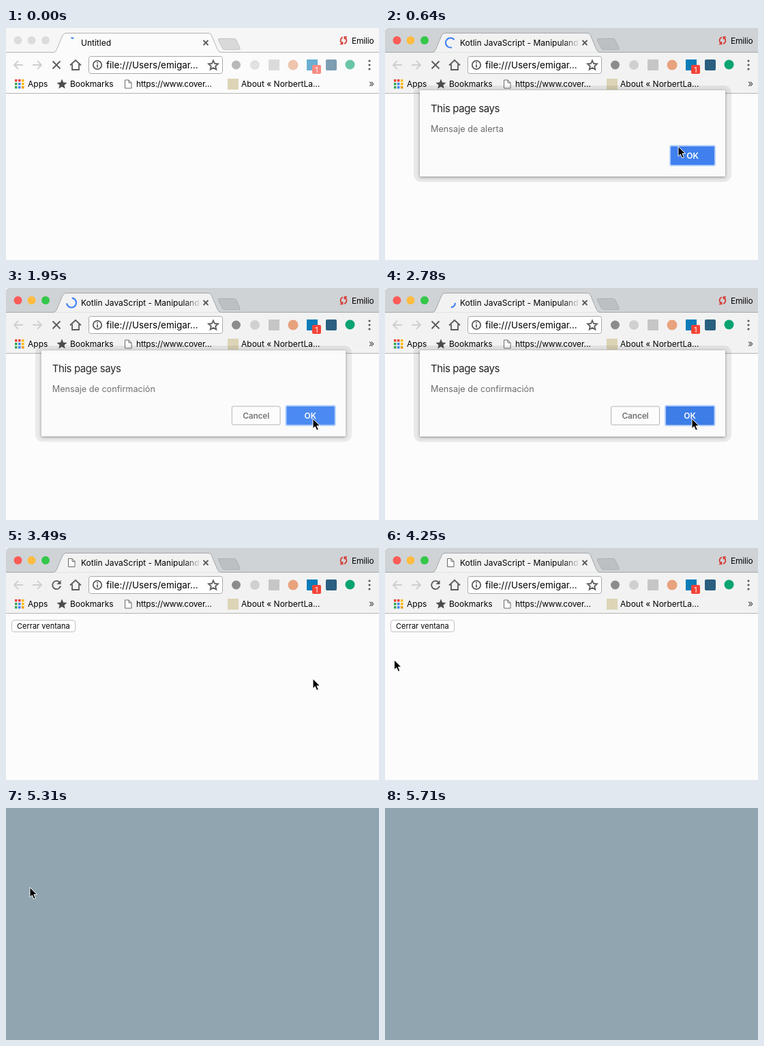
Animation, 547 px wide and 339 px high, one loop 6.19 s. Source, as an HTML page:

```html
<!DOCTYPE html>
<html lang="es">
<head>
<meta charset="utf-8">
<title>Browser dialogs</title>
<style>
html, body { margin: 0; width: 100%; height: 100%; overflow: hidden; background: #90a5b0; }
svg { display: block; width: 547px; height: 339px; font: 12px Inter, "Open Sans", sans-serif; --frame: #cfd3d6; --bar: #f2f2f2; --edge: #a3a7aa; --plus: #bcc0c3; --dim: 1; }
svg.idle { --frame: #f6f6f6; --bar: #fbfbfb; --edge: #b4b4b4; --plus: #d9d9d9; --dim: .6; }
.idle #lights circle { fill: #dcdcdc; }
#ext { opacity: var(--dim); }
.line { fill: none; stroke: #5a5a5a; stroke-width: 1.8; }
.soft { stroke: #cfcfcf; }
.page { fill: #fff; stroke: #6a6a6a; }
.btn { font-weight: 600; text-anchor: middle; }
.ok { fill: #4080ee; stroke: #b3cffa; stroke-width: 2; }
</style>
</head>
<body>
<svg id="stage" viewBox="0 0 547 339">
  <defs>
    <linearGradient id="fade">
      <stop offset="0" stop-color="var(--bar)" stop-opacity="0"/>
      <stop offset="1" stop-color="var(--bar)"/>
    </linearGradient>
    <linearGradient id="press" x2="0" y2="1">
      <stop offset="0" stop-color="#559cf8"/>
      <stop offset="1" stop-color="#0d62ee"/>
    </linearGradient>
    <filter id="blur" x="-10%" y="-20%" width="120%" height="140%"><feGaussianBlur stdDeviation="2.2"/></filter>
    <path id="sheet" class="page" d="M.5 .5h5.500l4 4v8h-9.500zM6 .5v4h4"/>
  </defs>

  <g id="window">
    <rect width="547" height="339" fill="#fcfcfc"/>
    <path d="M0 36V5Q0 0 5 0H547V36z" fill="var(--frame)"/>
    <g id="lights">
      <circle cx="17.500" cy="18" r="6" fill="#fc5b57"/>
      <circle cx="37.500" cy="18" r="6" fill="#fdbc40"/>
      <circle cx="58" cy="18" r="6" fill="#34c749"/>
    </g>
    <rect y="36" width="547" height="60" fill="var(--bar)"/>
    <path d="M0 35.500H70Q73 35 74.500 31L83 11Q84.500 7.500 88 7.500H297Q300 7.500 301.500 11L310 31Q312 35.500 315 35.500H547" fill="var(--bar)" stroke="var(--edge)"/>
    <path d="M313 15.500H334Q337 15.500 338 18L343 29Q344 31.500 341 31.500H321Q318 31.500 317 29L311.500 18Q310.500 15.500 313 15.500z" fill="var(--plus)" stroke="var(--edge)" stroke-opacity=".7"/>
    <path id="spin" fill="none" stroke="#3f82f4" stroke-width="2.200"/>
    <use id="tabSheet" href="#sheet" x="91" y="15"/>
    <text id="title" x="110" y="26"></text>
    <rect x="262" y="12" width="24" height="19" fill="url(#fade)"/>
    <path class="line" stroke-width="1.500" d="M289.500 18l7 7m0-7l-7 7"/>
    <path fill="none" stroke="#d63a32" stroke-width="1.700" d="M494 13.500a5 5 0 0 0-1 9M490 23.500h3.500v-3.500M496 23a5 5 0 0 0 1-9M500 13h-3.500v3.500"/>
    <text x="507" y="23" letter-spacing="-.2">Emilio</text>

    <path class="line soft" d="M25 54H12m6-6l-6 6l6 6M39 54H52m-6-6l6 6l-6 6"/>
    <path id="stop" class="line" d="M68.500 48.500l11 11m0-11l-11 11"/>
    <g id="reload">
      <path class="line" d="M78.500 50a6 6 0 1 0 1.500 5.500"/>
      <path d="M80.500 47v6h-6z" fill="#5a5a5a"/>
    </g>
    <path class="line" d="M94 54.500l8-7.500l8 7.500M97 53v8h10v-8"/>
    <rect x="121.500" y="41.500" width="196" height="25" rx="3" fill="#fff" stroke="#a9a9a9"/>
    <circle class="line" cx="134" cy="54" r="6.200" stroke-width="1.400"/>
    <path class="line" d="M134 50v1.800m0 1.500v4.500"/>
    <text x="147" y="59" font-size="13.500">file:///Users/emigar…</text>
    <path class="line" stroke-width="1.400" d="M304 47.500l2 4.500l5 .5l-3.800 3.300l1.100 4.900l-4.300-2.600l-4.300 2.600l1.100-4.900l-3.800-3.300l5-.5z"/>

    <g id="ext">
      <circle cx="337.500" cy="54" r="6.500" fill="#8c8c8c"/>
      <circle cx="365" cy="54" r="7" fill="#d0d0d0"/>
      <rect x="385" y="46" width="16" height="16" fill="#c6c6c6"/>
      <circle cx="421" cy="54" r="7.500" fill="#e8a27c"/>
      <rect x="441" y="46" width="16" height="16" fill="#0b7cb8"/>
      <rect x="449" y="54" width="13" height="13" rx="2" fill="#f44336"/>
      <text x="455.500" y="64.500" font-size="10.500" fill="#fff" text-anchor="middle">1</text>
      <rect x="469" y="46" width="16" height="16" rx="2" fill="#2a5f80"/>
      <circle cx="504.500" cy="53.500" r="7" fill="#0ba372"/>
    </g>
    <path d="M533 48h.01m0 6h-.01m0 6h.01" stroke="#5a5a5a" stroke-width="3.200" stroke-linecap="round"/>

    <g id="apps"></g>
    <text x="32" y="86">Apps</text>
    <path fill="#4d4d4d" d="M82 74.500l2.100 5l5.400 .4l-4.100 3.500l1.300 5.200l-4.700-2.800l-4.700 2.800l1.300-5.200l-4.100-3.500l5.400-.4z"/>
    <text x="94" y="86">Bookmarks</text>
    <use href="#sheet" x="174" y="75.500"/>
    <text x="191" y="86" letter-spacing="-.2">https://www.cover…</text>
    <rect x="325" y="74" width="16" height="16" fill="#ddd4b6"/>
    <text x="345" y="86">About « NorbertLa…</text>
    <text x="532" y="86" font-size="14" fill="#444">»</text>
    <path d="M0 95.500H547" stroke="#b5b5b5"/>

    <g id="close">
      <rect id="face" x="8.500" y="105.500" width="93" height="17" rx="3.500"/>
      <text x="16" y="118" font-size="11">Cerrar ventana</text>
    </g>

    <g id="dialog">
      <rect x="42" y="84" width="466" height="141" rx="11" fill="#000" opacity=".075"/>
      <rect x="51" y="92" width="448" height="126" fill="#000" opacity=".42" filter="url(#blur)"/>
      <rect x="51" y="91" width="448" height="126" rx="1" fill="#fbfbfb"/>
      <text x="67" y="123" font-size="15" letter-spacing="-.4" fill="#222">This page says</text>
      <text id="message" x="67" y="152" font-size="12.700" fill="#6c6c6c"></text>
      <g id="alertBtn" class="btn">
        <rect class="ok" x="418" y="172" width="66" height="29" rx="2"/>
        <text x="451" y="191" fill="#fff">OK</text>
      </g>
      <g id="confirmBtn" class="btn">
        <rect x="331.500" y="173" width="71" height="27" rx="2" fill="#fcfcfc" stroke="#b3b3b3"/>
        <text x="367" y="191" fill="#757575" letter-spacing="-.2">Cancel</text>
        <rect id="confirmOk" class="ok" x="411" y="172" width="72.500" height="29" rx="2"/>
        <text x="447" y="191" fill="#fff">OK</text>
      </g>
    </g>
  </g>
  <path id="cursor" d="M0 0V14.500L3.300 11.400L5.700 17L8.300 15.900L5.900 10.400H10.500z" stroke="#fff" stroke-width="1"/>
</svg>

<script>
const LOOP = 6190;
const $ = id => document.getElementById(id);
const clamp = v => Math.max(0, Math.min(1, v));
const part = (t, from, to) => clamp((t - from) / (to - from));
const easeOut = p => 1 - (1 - p) ** 3;
const smooth = p => p * p * (3 - 2 * p);
const show = (id, on) => { $(id).style.display = on ? "" : "none"; };

// Cursor stops: time, x, y
const route = [
  [380, 550, 150], [620, 430, 173], [700, 430, 173], [1150, 450, 191],
  [3740, 450, 191], [4020, 12, 167], [4150, 12, 167], [4780, 35, 116],
  [5500, 35, 116], [5710, 550, 380]
];

function cursorAt(t) {
  const i = route.findIndex(stop => stop[0] > t);
  if (i < 1) return null;
  const [t0, x0, y0] = route[i - 1], [t1, x1, y1] = route[i];
  const p = smooth(part(t, t0, t1));
  return [x0 + (x1 - x0) * p, y0 + (y1 - y0) * p];
}

// Arc grows from its tail, then the tail catches up, while the ring turns
function spinner(t) {
  const step = (t + 80) / 666, n = Math.floor(step), p = step - n;
  const turn = -95 + 360 * t / 1568 + 270 * Math.floor(n / 2);
  const tail = turn + (n % 2 ? 270 * p : 0);
  const sweep = Math.max(8, 270 * (n % 2 ? 1 - p : p));
  const point = deg => {
    const a = deg * Math.PI / 180;
    return `${96 + 7 * Math.cos(a)} ${21.5 + 7 * Math.sin(a)}`;
  };
  return `M${point(tail)}A7 7 0 ${sweep > 180 ? 1 : 0} 1 ${point(tail + sweep)}`;
}

const dots = ["#ea4335", "#ea4335", "#fbbc05", "#34a853", "#4285f4", "#fbbc05", "#34a853", "#4285f4", "#f29900"];
$("apps").innerHTML = dots.map((c, i) =>
  `<rect x="${13 + i % 3 * 5}" y="${75 + Math.floor(i / 3) * 5}" width="3.500" height="3.500" fill="${c}"/>`).join("");

function draw(t) {
  const idle = t < 50, loaded = t >= 3490, pressed = t >= 4840, confirming = t >= 1830;
  $("stage").setAttribute("class", idle ? "idle" : "");
  show("window", t < 5310);
  $("title").textContent = idle ? "Untitled" : "Kotlin JavaScript - Manipuland";

  show("spin", !loaded);
  $("spin").setAttribute("d", spinner(t));
  show("tabSheet", loaded);
  show("stop", !loaded);
  show("reload", loaded);
  show("close", loaded);
  $("face").setAttribute("fill", pressed ? "url(#press)" : "#fff");
  $("face").setAttribute("stroke", pressed ? "#1d5fd0" : "#c2c2c2");

  const [opens, shuts] = confirming ? [1830, 3310] : [180, 1660];
  const grow = easeOut(part(t, opens, opens + 180));
  const alpha = grow * (1 - part(t, shuts, shuts + 140));
  const size = .9 + .1 * grow;
  show("dialog", alpha > 0);
  $("dialog").setAttribute("opacity", alpha);
  $("dialog").setAttribute("transform", `translate(275 154) scale(${size}) translate(-275 -154)`);
  $("message").textContent = "Mensaje de " + (confirming ? "confirmación" : "alerta");
  show("alertBtn", !confirming);
  show("confirmBtn", confirming);
  $("confirmOk").style.fill = t < 2010 ? "#4586f2" : "#3d7de8";

  const at = cursorAt(t);
  show("cursor", at);
  if (at) $("cursor").setAttribute("transform", `translate(${at})`);
}

function tick() {
  draw(performance.now() % LOOP);
  requestAnimationFrame(tick);
}
tick();
</script>
</body>
</html>
```
